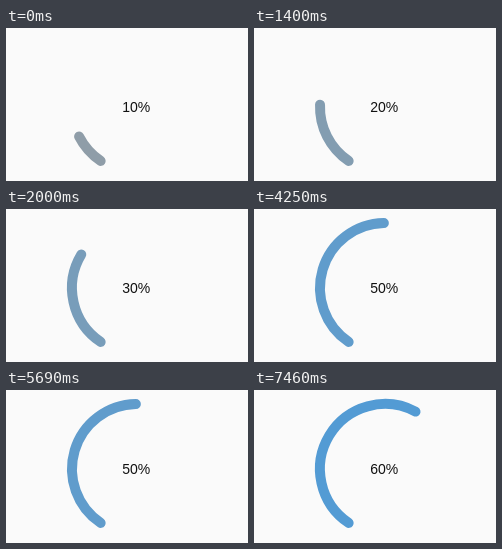
An HTML page for the animation above (8 s loop, 242x153 px).

```html
<!DOCTYPE html>
<html lang="en">
<head>
<meta charset="utf-8">
<title>Progress gauge</title>
<style>
  html, body { margin: 0; width: 100%; height: 100%; overflow: hidden; background: #fafafa; }
  svg { display: block; width: 242px; height: 153px; }
  path { fill: none; stroke-width: 10; stroke-linecap: round; }
  text { font: 14px "Liberation Sans", Arial, sans-serif; fill: #111; text-anchor: middle; }
</style>
</head>
<body>
<svg viewBox="0 0 242 153">
  <path id="arc"/>
  <text id="label" x="130.3" y="84"></text>
</svg>
<script>
const LOOP = 8000;
const CX = 131, CY = 79, R = 65;
const START = 124, SWEEP = 290; // degrees, clockwise from the right

const steps = [
  { at: 0, percent: 10, color: '#8f9da8' },
  { at: 500, percent: 20, color: '#839db1' },
  { at: 2000, percent: 30, color: '#789dba' },
  { at: 3050, percent: 40, color: '#6c9cc3' },
  { at: 4250, percent: 50, color: '#609ccc' },
  { at: 6650, percent: 60, color: '#539bd4' }
];

const arc = document.getElementById('arc');
const label = document.getElementById('label');

function point(deg) {
  const a = deg * Math.PI / 180;
  return `${(CX + R * Math.cos(a)).toFixed(2)} ${(CY + R * Math.sin(a)).toFixed(2)}`;
}

function draw({ percent, color }) {
  const sweep = SWEEP * percent / 100;
  const large = sweep > 180 ? 1 : 0;
  arc.setAttribute('d', `M${point(START)} A${R} ${R} 0 ${large} 1 ${point(START + sweep)}`);
  arc.setAttribute('stroke', color);
  label.textContent = percent + '%';
}

let shown = null;
const begin = performance.now();

function tick() {
  const t = (performance.now() - begin) % LOOP;
  const step = steps.findLast(s => s.at <= t);
  if (step !== shown) draw(shown = step);
  requestAnimationFrame(tick);
}
tick();
</script>
</body>
</html>
```
